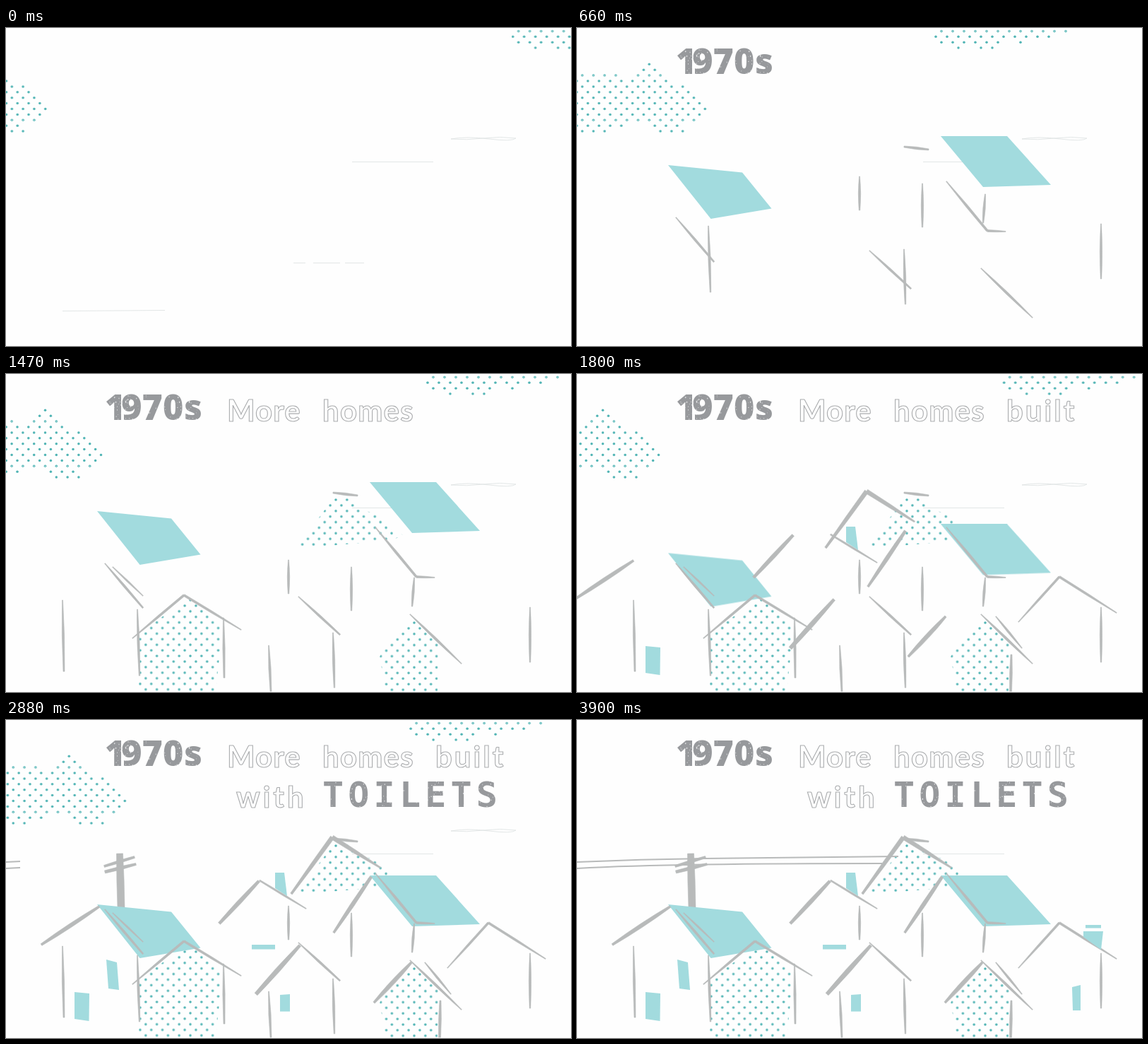
An HTML page for the animation above (5.25 s loop, 800 px wide and 450 px high).

```html
<!DOCTYPE html>
<html lang="en">
<head>
<meta charset="utf-8">
<title>1970s homes</title>
<style>
  html, body { margin: 0; width: 100%; height: 100%; overflow: hidden; background: #fefefe; }
  svg { display: block; width: 100vw; height: 100vh; }
  .solid { fill: url(#grain); }
  .line { font: 700 42px Lato, sans-serif; fill: #fefefe; stroke: #a9abad; stroke-width: 1.1; }
</style>
</head>
<body>
<svg id="stage" viewBox="0 0 800 450"></svg>
<script>
const LOOP = 5250, PITCH = 15.8, HALF = PITCH / 2;
const GREY = '#b8baba', BLUE = '#a2dbde', TEAL = '#50b4b4', PAPER = '#fefefe';
const stage = document.getElementById('stage');

function add(parent, tag, attrs = {}, text = '') {
  const el = document.createElementNS('http://www.w3.org/2000/svg', tag);
  for (const key in attrs) el.setAttribute(key, attrs[key]);
  el.textContent = text;
  parent.appendChild(el);
  return el;
}

const group = () => add(stage, 'g');
const timing = { duration: LOOP, iterations: Infinity };

// Hard on and off.
function show(el, on, off = LOOP) {
  const keys = [{ offset: 0, opacity: on ? 0 : 1 }];
  if (on) keys.push({ offset: on / LOOP, opacity: 1 });
  if (off < LOOP) keys.push({ offset: off / LOOP, opacity: 0 });
  keys.push({ offset: 1, opacity: off < LOOP ? 0 : 1 });
  el.animate(keys.map(k => ({ ...k, easing: 'step-end' })), timing);
  return el;
}

// Steps of [time, x, y].
function move(el, steps) {
  const first = steps[0], last = steps[steps.length - 1];
  const all = [[0, first[1], first[2]], ...steps.filter(s => s[0] > 0), [LOOP, last[1], last[2]]];
  el.animate(all.map(([t, x, y]) => ({ offset: t / LOOP, transform: `translate(${x}px, ${y}px)` })), timing);
  return el;
}

const slide = (el, dx, dy, from, to) => move(el, [[from, dx, dy], [to, 0, 0]]);

// A brush stroke with its width at the start, middle and end.
function brush(parent, x1, y1, x2, y2, a = 1, m = 5, b = 1) {
  const len = Math.hypot(x2 - x1, y2 - y1);
  const nx = (y1 - y2) / len / 2, ny = (x2 - x1) / len / 2;
  const at = (x, y, w) => `${x + nx * w} ${y + ny * w}`;
  const mx = (x1 + x2) / 2, my = (y1 + y2) / 2;
  add(parent, 'path', {
    d: `M${at(x1, y1, a)}Q${at(mx, my, m)} ${at(x2, y2, b)}L${at(x2, y2, -b)}Q${at(mx, my, -m)} ${at(x1, y1, -a)}Z`,
    fill: GREY, stroke: GREY, 'stroke-width': .6, 'stroke-linejoin': 'round'
  });
}

const shape = (parent, points, fill = BLUE) => add(parent, 'polygon', { points, fill });

function dot(parent, cx, cy, hollow) {
  add(parent, 'circle', { cx, cy, r: 1.75, fill: TEAL });
  if (hollow) add(parent, 'circle', { cx, cy, r: .6, fill: PAPER });
}

const defs = add(stage, 'defs');

// Speckled ink for the heavy lettering.
const grain = add(defs, 'pattern', { id: 'grain', width: 90, height: 45, patternUnits: 'userSpaceOnUse' });
add(grain, 'rect', { width: 90, height: 45, fill: '#97999c' });
let seed = 7;
const random = () => (seed = seed * 16807 % 2147483647) / 2147483647;
for (let i = 0; i < 90; i++) {
  add(grain, 'ellipse', {
    cx: random() * 90, cy: random() * 45, rx: .3 + random() * .5, ry: .3 + random() * .8, fill: '#e6e7e8'
  });
}

// Clouds: each row holds spans of half steps from the leading edge.
const leftCloud = group(), rightCloud = group();
[
  [10, 10], [9, 11], [8, 12, 16, 22], [7, 23], [4, 24], [3, 25], [2, 24],
  [1, 25], [0, 24], [1, 25], [2, 24], [5, 9, 15, 25], [4, 8, 18, 24]
].forEach((spans, row) => {
  for (let s = 0; s < spans.length; s += 2)
    for (let i = spans[s]; i <= spans[s + 1]; i += 2)
      dot(leftCloud, -1.5 - HALF * i, 51.3 + HALF * row, row === 2 || row === 10);
});
move(leftCloud, [[0, 57, 0], [570, 188, 0], [1800, 117, 0], [2797, 174.6, 0], [3794, 117, 0], [3900, 123, 0]]);
show(leftCloud, 0, 3900);

[[1, 23], [0, 20], [1, 11, 15, 15], [4, 4, 8, 10]].forEach((spans, row) => {
  for (let s = 0; s < spans.length; s += 2)
    for (let i = spans[s]; i <= spans[s + 1]; i += 2)
      dot(rightCloud, 8 * i, 4.4 + HALF * row, row === 0);
});
move(rightCloud, [[0, 718, 0], [570, 498, 0], [1654, 617, 0], [2529, 543.6, 0], [3488, 624, 0], [3900, 589, 0]]);
show(rightCloud, 0, 3900);

// Faint pencil traces.
function trace(d, off) {
  show(add(stage, 'path', { d, fill: 'none', stroke: '#dfe4e4', 'stroke-width': .9 }), 0, off);
}
trace('M630 157Q652 153 684 157T722 156Q700 153 676 156T630 157', 3570);
trace('M490 189.5H605', LOOP);
trace('M407 332.5H424M435 332.5H473M480 332.5H507', 300);
trace('M80 400.5L225 399.5', 300);

// Dotted walls.
function wall(id, x, y, points, on) {
  const pattern = add(defs, 'pattern', {
    id, x: x - HALF / 2, y: y - HALF / 2, width: PITCH, height: PITCH, patternUnits: 'userSpaceOnUse'
  });
  dot(pattern, HALF / 2, HALF / 2);
  dot(pattern, HALF * 1.5, HALF * 1.5);
  show(shape(stage, points, `url(#${id})`), on);
}
wall('wallA', 467, 178, '464,175 487,175 500,190 522,198 562,228 545,236 418,246 416,240 450,194', 840);
wall('wallB', 261, 320, '261,317 303,357 303,392 297,449 188,449 188,368 205,355 222,343 240,334', 930);
wall('wallC', 578, 352, '577,346 612,382 611,449 538,449 529,400 537,385', 1020);

// Utility pole, behind the roof.
const pole = show(group(), 2580);
brush(pole, 161, 189, 163, 266, 9, 11, 10);
brush(pole, 139, 207, 182, 194, 3, 5, 3);
brush(pole, 140, 215, 184, 204, 4, 6, 3);

// Blue roofs wait above the houses, then drop.
const roofs = show(group(), 420);
shape(roofs, '129,261 234,271.5 275.5,322.5 189.5,337');
shape(roofs, '515,220 609,220 671,289 575,292');
slide(roofs, 0, -67, 1500, 1840);

// Right-hand roof strokes.
const slopes = show(group(), 570);
brush(slopes, 140, 268, 194, 331, 1, 5, 2);
brush(slopes, 414, 315, 473, 369, 1, 5, 2);
brush(slopes, 523, 217, 581, 287, 1, 5, 3);
brush(slopes, 581, 287, 607, 288, 3, 3, 1);
brush(slopes, 572, 340, 645, 410, 1, 6, 1);
brush(slopes, 463, 168, 498, 172, 2, 5, 2);

const posts = show(group(), 600);
[
  [400, 263, 400, 311], [489, 273, 489, 335], [186, 333, 189, 427],
  [463, 366, 465, 444], [578, 288, 575, 329], [742, 330, 742, 408]
].forEach(p => brush(posts, ...p, 1, 5.5, 1.5));
slide(posts, 0, -53, 720, 1020);

// Remaining outlines: time, then the stroke.
[
  [1230, 80, 320, 82, 421, 1, 5, 2],
  [1290, 151, 273, 194, 314, 1, 4, 1],
  [1350, 179, 374, 252, 313, 1, 4, 3],
  [1350, 252, 313, 333, 362, 3, 4, 1],
  [1410, 308, 345, 309, 430, 1, 5, 2],
  [1470, 372, 384, 375, 449, 1, 5, 2],
  [1530, 359, 227, 425, 267, 2, 4, 1],
  [1590, 625, 351, 683, 287, 1, 4, 3],
  [1590, 683, 287, 764, 338, 3, 4, 1],
  [1650, 593, 343, 630, 388, 1, 5, 1],
  [1680, 615, 397, 614, 449, 2, 5, 3]
].forEach(([on, ...stroke]) => brush(show(group(), on), ...stroke));

// Windows, doors and chimneys.
show(shape(stage, '97,385 118,387 117.5,426 97,423'), 1620);
show(shape(stage, '381,216 394,216 398,249 381,238'), 1710);
show(shape(stage, '142,339 157,343 160,382 145,380'), 2040);
show(shape(stage, '348,318 381,318 381,324.5 348,324.5'), 2400);
show(shape(stage, '388,389 402,388 402,412.5 388,412.5'), 2520);
slide(show(shape(stage, '701,378 713,375 713,411 702,411'), 3120), 0, 19, 3150, 3360);
show(shape(stage, '717,299 745,299 742,325 717,307'), 3330);
show(shape(stage, '720,290 742,290 742,294.5 720,294.5'), 3450);

// Left-hand roof strokes come in from the left.
const eaves = show(group(), 1740);
brush(eaves, 50, 318, 132, 264, 3, 8, 3);
brush(eaves, 302, 288, 358, 228, 4, 8, 4);
brush(eaves, 354, 388, 416, 319, 5, 9, 4);
brush(eaves, 464, 301, 517, 222, 3, 8, 4);
brush(eaves, 521, 400, 574, 343, 3, 9, 3);
brush(eaves, 404, 246, 462, 166, 3, 6, 6);
brush(eaves, 462, 166, 530, 209, 6, 6, 2);
slide(eaves, -52, 0, 1890, 2130);

// Wires unroll from the left edge.
const wires = add(stage, 'g', { fill: 'none', stroke: GREY, 'stroke-width': 2 });
add(wires, 'path', { d: 'M0 201Q90 197 180 196T455 193' });
add(wires, 'path', { d: 'M0 210Q70 206 180 204.5T432 203' });
wires.animate([
  { offset: 0, clipPath: 'inset(-2px 100% -2px 0)' },
  { offset: 2850 / LOOP, clipPath: 'inset(-2px 100% -2px 0)' },
  { offset: 3570 / LOOP, clipPath: 'inset(-2px 0% -2px 0)' },
  { offset: 1, clipPath: 'inset(-2px 0% -2px 0)' }
], timing);

// Lettering.
const write = (text, x, y, on, attrs) => show(add(stage, 'text', { x, y, ...attrs }, text), on);
const outline = spacing => ({ class: 'line', 'letter-spacing': spacing });
const year = write('1970s', 140, 65, 120, {
  class: 'solid', dx: '0 -6', style: 'font: 800 50px "Open Sans", sans-serif'
});
slide(year, 0, -66, 120, 330);
write('More', 313, 67, 1260, outline(1));
write('homes', 448, 67, 1410, outline(1.2));
write('built', 608, 67, 1560, outline(3));
write('with', 326, 124, 1980, outline(4));
write('TOILETS', 448, 123, 2100, {
  class: 'solid', 'letter-spacing': 6.2, style: 'font: 700 50px "DejaVu Sans Mono", monospace'
});
</script>
</body>
</html>
```
